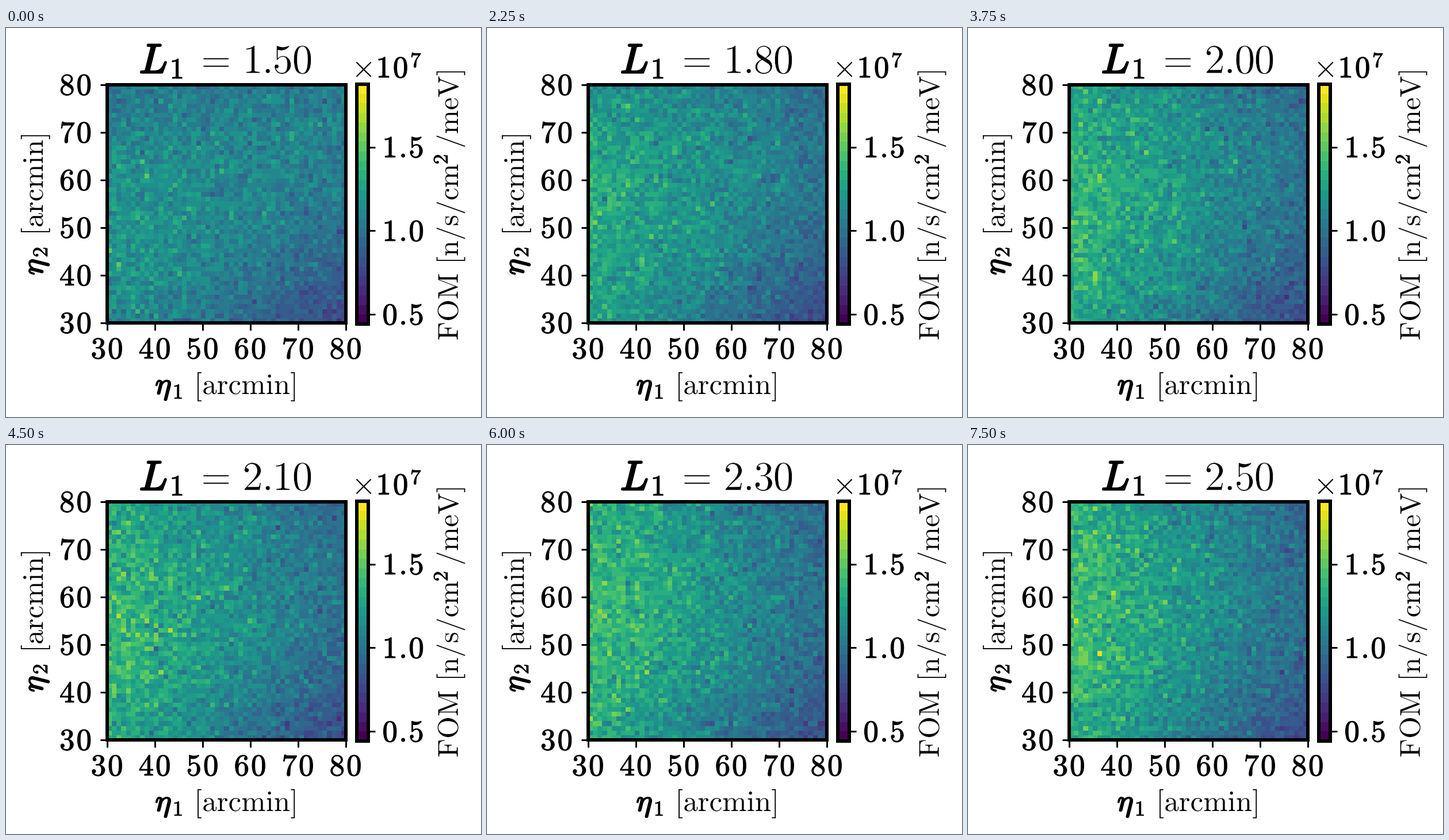
Recreate the animation shown at these times as a matplotlib script. Size 826 by 678 pixels, loop 8000 ms.

```python
import numpy as np
import matplotlib.pyplot as plt
from matplotlib.animation import FuncAnimation
from matplotlib.patches import PathPatch, Rectangle
from matplotlib.path import Path
from matplotlib.textpath import TextPath
from matplotlib.transforms import Affine2D

W, H = 826, 678
PX = 0.72                                   # points per pixel at 100 dpi
LEFT, RIGHT, TOP, BOTTOM = 176, 591, 99, 514
BAR = (609.5, 630, 516, 98)                 # left, right, bottom, top
V_MIN, V_MAX = 0.445, 1.876
CELLS, STEPS, HOLD = 51, 11, 3

plt.rcParams["mathtext.fontset"] = "cm"
fig = plt.figure(figsize=(W / 100, H / 100), dpi=100, facecolor="white")
ax = fig.add_axes([0, 0, 1, 1])
ax.axis("off")
cmap = plt.get_cmap("viridis", 25)


def glyphs(s, style, size):
    return TextPath((0, 0), rf"$\{style}{{{s}}}$", size=size)


def digits(s, style, size, step, dot):
    """Numerals set on a fixed pitch, given in em."""
    parts, x = [], 0
    for c in s:
        adv = dot if c == "." else step
        side = (adv - (0.278 if c == "." else 0.5)) / 2
        shift = Affine2D().translate((x + side) * size, 0)
        parts.append(glyphs(c, style, size).transformed(shift))
        x += adv
    return Path.make_compound_path(*parts)


def put(path, x, y, weight=0, up=False, ink=True):
    """Place a text path; weight > 0 thickens the strokes, < 0 thins them."""
    if ink:
        path = path.transformed(Affine2D().translate(-path.get_extents().x0, 0))
    place = Affine2D().scale(1, -1).rotate_deg(-90 if up else 0).translate(x, y)
    patch = PathPatch(path.transformed(place), facecolor="black",
                      edgecolor="black" if weight > 0 else "white",
                      linewidth=abs(weight) * PX, joinstyle="round", zorder=5)
    ax.add_patch(patch)
    return patch


def bold(s, size=53):
    return digits(s, "mathbf", size, 0.555, 0.31)


def tick(x0, y0, x1, y1):
    ax.plot([x0, x1], [y0, y1], color="black", lw=3 * PX,
            solid_capstyle="butt", zorder=4)


def frame_box(l, r, b, t):
    ax.add_patch(Rectangle((l, t), r - l, b - t, fill=False, ec="black",
                           lw=6 * PX, joinstyle="miter", zorder=4))


def field(step):
    """Noisy figure of merit for one step; row 0 is the top of the map."""
    u, w = np.meshgrid(np.linspace(0, 1, CELLS), np.linspace(1, 0, CELLS))
    k = 1 - (1 - step / (STEPS - 1)) ** 2
    crest = 1.2 + 0.25 * k - (0.15 + 0.33 * k) * u
    centre = 0.35 + 0.15 * k + (0.45 - 0.3 * k) * u
    mean = crest - 0.46 * (w - centre) ** 2
    noise = np.random.default_rng(100 + step).normal(0, 0.08, mean.shape)
    return mean * (1 + noise)


# Heat map and colour bar
fields = [field(i) for i in range(STEPS)]
style = dict(cmap=cmap, aspect="auto", interpolation="nearest")
heat = ax.imshow(fields[0], extent=(LEFT, RIGHT, BOTTOM, TOP),
                 vmin=V_MIN, vmax=V_MAX, **style)
ax.imshow(np.arange(25)[::-1, None], extent=BAR, **style)
ax.set_xlim(0, W)
ax.set_ylim(H, 0)
frame_box(LEFT, RIGHT, BOTTOM, TOP)
frame_box(*BAR)

# Ticks with their numbers
for i, n in enumerate(range(30, 90, 10)):
    x = LEFT + i * (RIGHT - LEFT) / 5
    y = BOTTOM - i * (BOTTOM - TOP) / 5
    tick(x, BOTTOM, x, 527)
    tick(LEFT, y, 164, y)
    put(bold(str(n)), x - 29.9, 576, 1.1, ink=False)
    put(bold(str(n)), 91.5, y + 17.5, 1.1, ink=False)
for i, s in enumerate(("0.5", "1.0", "1.5")):
    y = 499.2 - i * 145.8
    tick(BAR[1], y, 642, y)
    put(bold(s), 653, y + 17.7, 1.1, ink=False)

# Scale factor of the bar
put(glyphs(r"\times", "mathrm", 54), 609, 86.2)
put(bold("10"), 642, 86.2, 1.1, ink=False)
put(bold("7", 37), 702, 68.2, 0.9, ink=False)

# Axis labels
eta = glyphs(r"\eta", "mathit", 53)
unit = glyphs("[arcmin]", "mathrm", 51)
put(eta, 261, 638, 2.3)
put(bold("1", 37), 293, 646, 0.9)
put(unit, 333, 638, -0.2)
put(eta, 64, 429, 2.3, up=True)
put(bold("2", 37), 72, 398, 0.9, up=True)
put(unit, 64, 356, -0.2, up=True)

for s, y in (("FOM", 543), ("[n/s/cm", 406), ("/meV]", 207)):
    put(glyphs(s, "mathrm", 50), 786, y, -0.2, up=True)
put(bold("2", 36), 768, 236, 0.9, up=True)

# Title
put(glyphs("L", "mathit", 72), 234.5, 78.5, 3)
put(bold("1", 51), 289, 88, 1.1)
put(glyphs("=", "mathrm", 67), 343, 77, -0.5)


def title_path(step):
    return digits(f"{1.5 + step / 10:.2f}", "mathrm", 72, 0.475, 0.25)


titles = [title_path(i) for i in range(STEPS)]
to_title = Affine2D().scale(1, -1).translate(412, 79)
value = put(titles[0], 412, 79, -0.7, ink=False)


def draw(n):
    step = n // HOLD
    heat.set_data(fields[step])
    value.set_path(titles[step].transformed(to_title))
    return heat, value


anim = FuncAnimation(fig, draw, frames=32, interval=250, repeat=True,
                     repeat_delay=0, blit=False)
plt.show()
```
